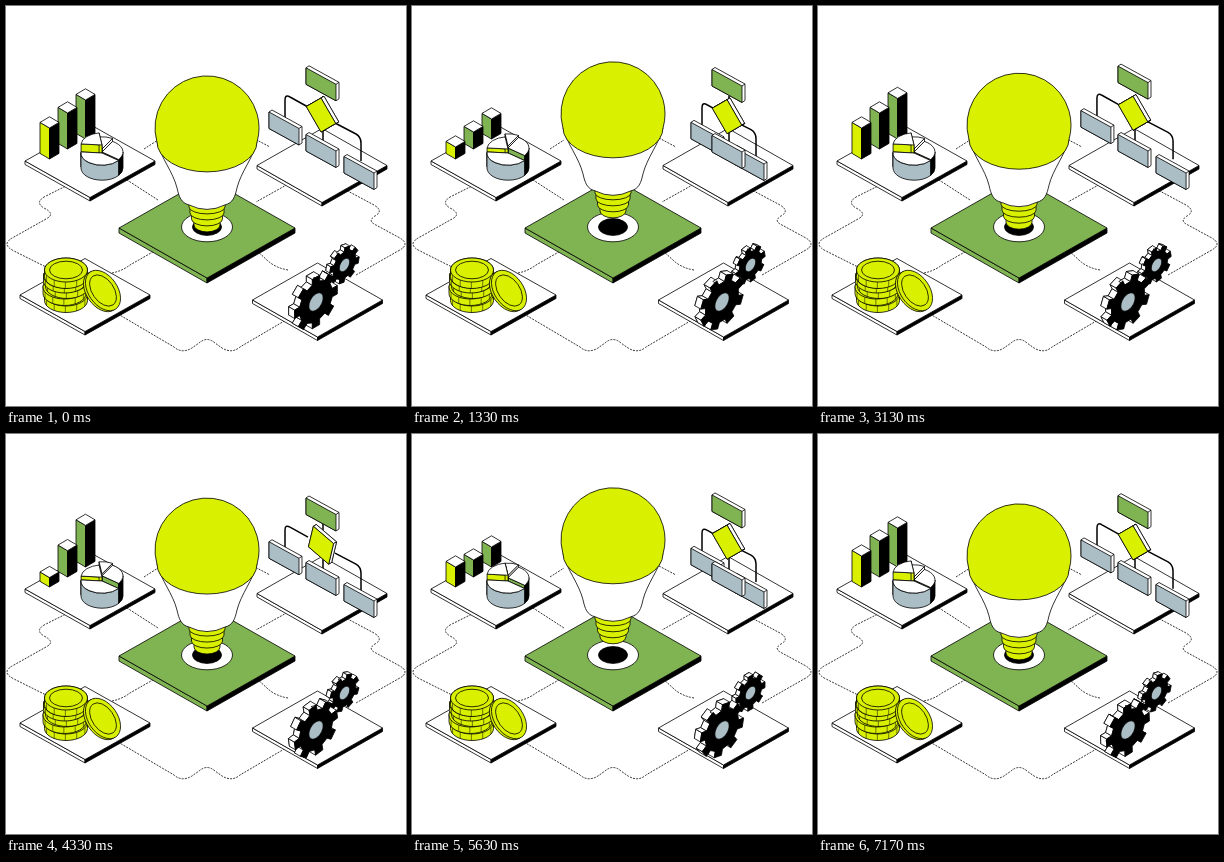
Animation of 400 by 400 pixels, one loop 7210 ms. Source, as an HTML page with a canvas:

```html
<!DOCTYPE html>
<html lang="en">
<head>
<meta charset="utf-8">
<title>Idea network</title>
<style>
  html, body { margin: 0; width: 100%; height: 100%; overflow: hidden; background: #fff; }
  canvas { display: block; width: 400px; height: 400px; }
</style>
</head>
<body>
<canvas id="stage"></canvas>
<script>
const PERIOD = 3605, TAU = Math.PI * 2;
const LIME = '#d9f000', GREEN = '#80b352', STEEL = '#abbdc5', INK = '#000', WHITE = '#fff';

const canvas = document.getElementById('stage');
const ratio = window.devicePixelRatio || 1;
canvas.width = canvas.height = 400 * ratio;
const ctx = canvas.getContext('2d');
ctx.scale(ratio, ratio);
ctx.lineJoin = 'round';

function paint(fill, line = 0.8) {
  if (fill) { ctx.fillStyle = fill; ctx.fill(); }
  if (line) { ctx.strokeStyle = INK; ctx.lineWidth = line; ctx.stroke(); }
}

function poly(points, fill, line) {
  ctx.beginPath();
  points.forEach(([x, y]) => ctx.lineTo(x, y));
  ctx.closePath();
  paint(fill, line);
}

function oval(x, y, rx, ry, fill, tilt = 0, line) {
  ctx.beginPath();
  ctx.ellipse(x, y, rx, ry, tilt, 0, TAU);
  paint(fill, line);
}

function trace(d, line) {
  ctx.strokeStyle = INK;
  ctx.lineWidth = line;
  ctx.stroke(new Path2D(d));
}

// Timing
const clamp = v => Math.min(1, Math.max(0, v));

function back(u, c) {
  const v = 2 * u;
  if (u < 0.5) return v * v * ((c + 1) * v - c) / 2;
  return ((v - 2) ** 2 * ((c + 1) * (v - 2) + c) + 2) / 2;
}

// 0 at rest, 1 between the two moves
function toggle(t, start, end, length, c = 3.5) {
  return back(clamp((t - start) / length), c) - back(clamp((t - end) / length), c);
}

// Ground
const WIRES = [
  'M62 179L40 190Q28 196 38 202Q50 208 40 213L8 231Q-6 238 8 245L50 266',
  'M338 183L368 199Q378 205 369 210Q361 215 370 219L392 231Q406 238 392 245L350 269',
  'M112 308L168 341Q176 348 186 342L193 337Q201 330 209 337L216 342Q226 348 234 341L280 314',
  'M118 172L152 194M284 177L250 196M106 267Q116 265 124 259L152 243M282 264Q270 262 262 255L249 243',
  'M138 143L152 134M247 132L264 141'
];

function wires() {
  ctx.setLineDash([2, 1.2]);
  WIRES.forEach(d => trace(d, 0.8));
  ctx.setLineDash([]);
}

function plate(x, y, w, h, depth, fill, side) {
  const left = [x - w, y], right = [x + w, y], front = [x, y + h];
  const low = ([a, b]) => [a, b + depth];
  poly([left, front, low(front), low(left)], side);
  poly([front, right, low(right), low(front)], INK);
  poly([left, [x, y - h], right, front], fill);
}

// Charts
function bar(x, foot, height, fill) {
  const top = foot - height, w = 9.5, h = 5.6;
  poly([[x - w, top - h], [x, top], [x, foot], [x - w, foot - h]], fill);
  poly([[x, top], [x + w, top - h], [x + w, foot - h], [x, foot]], INK);
  poly([[x - w, top - h], [x, top - 2 * h], [x + w, top - h], [x, top]], WHITE);
}

function slice(from, to, lift, wall, cut) {
  const x = 96, y = 147 - lift, rx = 21, ry = 12.2, base = 15 + lift;
  const rad = Math.PI / 180;
  const rim = a => [x + rx * Math.cos(a * rad), y + ry * Math.sin(a * rad)];
  const drop = ([a, b]) => [a, b + base];
  for (const a of [from, to]) {
    const p = rim(a);
    poly([[x, y], p, drop(p), drop([x, y])], cut);
  }
  const lo = from >= 180 ? Math.max(from, 360) : from;
  const hi = from >= 180 ? to : Math.min(to, 180);
  if (hi > lo) {
    ctx.beginPath();
    ctx.ellipse(x, y, rx, ry, 0, lo * rad, hi * rad);
    ctx.ellipse(x, y + base, rx, ry, 0, hi * rad, lo * rad, true);
    ctx.closePath();
    paint(wall);
  }
  ctx.beginPath();
  ctx.moveTo(x, y);
  ctx.ellipse(x, y, rx, ry, 0, from * rad, to * rad);
  ctx.closePath();
  paint(WHITE);
}

function charts(t) {
  bar(79.5, 133, 39 - 19 * toggle(t, 585, 2525, 700), GREEN);
  bar(61.5, 143, 36 - 19 * toggle(t, 375, 2105, 700), GREEN);
  bar(43.5, 153, 31 - 19 * toggle(t, 165, 1685, 700), LIME);
  const shut = toggle(t, 165, 1685, 700, 1.5);
  slice(262, 300, 4 + 3 * shut, WHITE, WHITE);
  slice(300, 398, 1 + 4 * shut, INK, GREEN);
  slice(185, 262, 8 - 4 * shut, WHITE, LIME);
  slice(38, 185, 0, STEEL, STEEL);
}

// Tree
function card(x, y, fill) {
  const w = 30, slope = 16.5, h = 16.5;
  poly([[x, y], [x + 3, y - 2], [x + w + 3, y + slope - 2],
    [x + w + 3, y + slope + h - 2], [x + w, y + slope + h], [x, y + h]], WHITE);
  poly([[x, y], [x + w, y + slope], [x + w, y + slope + h], [x, y + h]], fill);
  trace(`M${x + w} ${y + slope}l3 -2`, 0.8);
}

function tree(t) {
  const bob = 2.3 * Math.sin(TAU * t / PERIOD);
  const fold = toggle(t, 780, 2670, 480, 1.8);
  const in16 = 16 * fold, in9 = 9 * fold, corner = 11 * fold;
  const lx = 279 + corner, ly = 88 + corner * 0.55 + bob;
  const rx = 355 - corner, ry = 131 - corner * 0.55 + bob;

  trace(`M317 90V138M302 ${101 + bob}L${lx + 5} ${ly + 3}Q${lx} ${ly} ${lx} ${ly + 6}V${ly + 24}`, 1.5);
  trace(`M329 ${117 + bob}L${rx - 5} ${ry - 3}Q${rx} ${ry} ${rx} ${ry + 6}V${ry + 24}`, 1.5);

  const turn = back(clamp((t - 350) / 700), 1.5) * Math.PI / 2;
  const corners = [0, 1, 2, 3].map(i => {
    const a = turn + i * Math.PI / 2;
    const u = 17 * Math.cos(a), v = 17 * Math.sin(a);
    return [315 + 0.866 * u, 109 + bob + 0.5 * u + v];
  });
  const shift = ([x, y]) => [x + 3, y - 1.7];
  poly(corners.map(shift), WHITE);
  corners.forEach((p, i) => {
    const q = corners[(i + 1) % 4];
    poly([p, q, shift(q), shift(p)], WHITE);
  });
  poly(corners, LIME);

  card(300, 62 + bob - 0.2, GREEN);
  card(263 + in16, 106 + in9 + bob * 0.8, STEEL);
  card(338 - in16, 150.5 - in9, STEEL);
  card(300, 128.5 + fold, STEEL);
}

// Coins
function coins() {
  [[60, 288], [58.5, 281], [61, 274], [59, 270], [60, 264]].forEach(([x, y], i) => {
    const deep = i === 3 ? 5 : 6.5, rx = 21.5, ry = 12;
    ctx.beginPath();
    ctx.ellipse(x, y, rx, ry, 0, Math.PI, 0);
    ctx.lineTo(x + rx, y + deep);
    ctx.ellipse(x, y + deep, rx, ry, 0, 0, Math.PI);
    ctx.closePath();
    paint(LIME);
    oval(x, y, rx, ry, LIME);
    for (let a = 0.5; a < 2.8; a += 0.55) {
      const px = x + rx * Math.cos(a), py = y + ry * Math.sin(a);
      trace(`M${px} ${py}v${deep}`, 0.5);
    }
  });
  oval(60, 264, 16.5, 8.8, LIME);
  const tilt = 0.96;
  oval(95, 285.5, 22.5, 14.5, LIME, tilt);
  oval(97, 284.5, 22.5, 14.5, LIME, tilt);
  oval(97, 284.5, 17.5, 10.8, LIME, tilt);
}

// Gears
function gear(x, y, r, hole, turn, depth) {
  const place = (a, d) => {
    const u = d * Math.cos(a), v = d * Math.sin(a);
    return [x + 0.866 * u, y - 0.5 * u + v];
  };
  const edge = [];
  for (let i = 0; i < 8; i++) {
    const a = turn + i * TAU / 8;
    [[-0.22, 0.77], [-0.17, 1], [0.17, 1], [0.22, 0.77]]
      .forEach(([da, d]) => edge.push(place(a + da, r * d)));
  }
  const [dx, dy] = [-depth, -depth * 0.58];
  const away = ([px, py]) => [px + dx, py + dy];
  poly(edge.map(away), WHITE);
  edge.forEach((p, i) => {
    const q = edge[(i + 1) % edge.length];
    const facing = (q[0] - p[0]) * dy - (q[1] - p[1]) * dx;
    if (facing < 0) poly([p, q, away(q), away(p)], WHITE);
  });
  poly(edge, INK);
  const ring = [];
  for (let a = 0; a < TAU; a += TAU / 40) ring.push(place(a, hole));
  poly(ring, STEEL);
}

function gears(t) {
  const turn = Math.PI * t / PERIOD;
  gear(338.5, 259, 17, 6, 0.2 - turn, 4);
  gear(310, 296, 25, 8.2, turn, 6);
}

// Bulb
function bulb(t) {
  oval(201, 221, 25.5, 14.8, WHITE);
  oval(201, 221, 14.5, 8.4, INK);

  ctx.save();
  ctx.translate(201, 121.9 - 8.37 * (1 - Math.cos(TAU * t / PERIOD)));

  // Screw, from the tip upward
  [[13, 97], [15.5, 91], [17, 85], [18, 79]].forEach(([w, y]) => {
    ctx.beginPath();
    ctx.moveTo(-w, y - 7);
    ctx.lineTo(-w, y);
    ctx.ellipse(0, y, w, 7, 0, Math.PI, 0, true);
    ctx.lineTo(w, y - 7);
    ctx.closePath();
    paint(LIME);
  });

  ctx.beginPath();
  ctx.moveTo(-50, 14);
  ctx.bezierCurveTo(-46, 30, -34, 44, -30, 60);
  ctx.bezierCurveTo(-28, 69, -26, 75, -18, 77);
  ctx.quadraticCurveTo(0, 86, 18, 77);
  ctx.bezierCurveTo(26, 75, 28, 69, 30, 60);
  ctx.bezierCurveTo(34, 44, 46, 30, 50, 14);
  ctx.closePath();
  paint(WHITE);

  ctx.beginPath();
  ctx.arc(0, 0, 52, Math.PI - 0.273, 0.273);
  ctx.ellipse(0, 14, 50, 30, 0, 0, Math.PI);
  ctx.closePath();
  paint(LIME);
  ctx.restore();
}

function draw() {
  const t = performance.now() % PERIOD;
  ctx.fillStyle = WHITE;
  ctx.fillRect(0, 0, 400, 400);
  wires();
  plate(84, 155, 65, 36.5, 3.5, WHITE, WHITE);
  plate(316, 159.5, 65, 37, 3.5, WHITE, WHITE);
  plate(79, 289, 65, 36.5, 3.5, WHITE, WHITE);
  plate(311.5, 294, 65, 37, 3.5, WHITE, WHITE);
  plate(201, 222, 88, 50, 5, GREEN, GREEN);
  charts(t);
  tree(t);
  coins();
  gears(t);
  bulb(t);
  requestAnimationFrame(draw);
}
draw();
</script>
</body>
</html>
```
